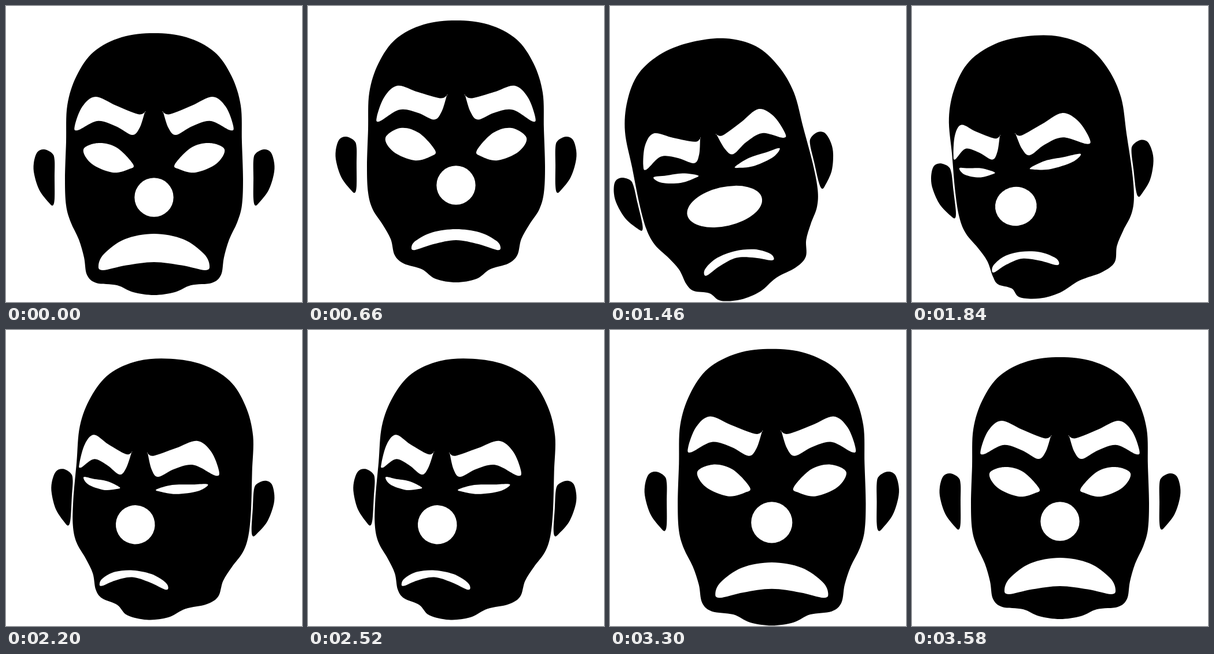
An HTML page with a canvas that plays this animation: 512 by 512 pixels, repeating every 3620 ms.

```html
<!DOCTYPE html>
<html>
<head>
<meta charset="utf-8">
<title>Angry head</title>
<style>
  html, body { margin: 0; height: 100%; overflow: hidden; background: #fff; }
  canvas { display: block; width: 100%; height: 100%; }
</style>
</head>
<body>
<canvas width="512" height="512"></canvas>
<script>
const LOOP = 3620, NECK = 545, RADIUS = 156, DEGREE = Math.PI / 180;
const ctx = document.querySelector('canvas').getContext('2d');

const clamp = u => Math.min(1, Math.max(0, u));
const smooth = u => u * u * (3 - 2 * u);
const ramp = (v, from, to) => smooth(clamp((v - from) / (to - from)));
const mix = (a, b, u) => a + (b - a) * u;
const wave = (t, zero, period) => Math.sin(2 * Math.PI * (t - zero) / period);

// Left-side outlines; x counts from the middle of the face.
const points = text => text.split(' ').map(pair => pair.split(',').map(Number));
const HEAD = points('0,47 -56,54 -104,79 -134,121 -150,172 -152,235 -154,300 -152,345 -144,374 -130,404 -121,435 -116,465 -100,479 -64,483 -36,495 0,500');
const EAR = points('0,-49 14,-42 18,-30 18,0 18,36 15,48 8,43 -8,22 -17,-5 -18,-25 -12,-44');
const BROW = points('-16,184 -28,187 -66,172 -101,157 -124,174 -137,207 -132,215 -98,199 -66,208 -38,223 -25,211');

const angry = {
  lift: 0, jaw: 0, squeeze: 1, brow: 0, slope: 0, nose: 331,
  eyeInner: 274, eyeTop: 237, eyeBottom: 288, eyeOuter: 248,
  mouthWidth: 96, mouthTop: 394, mouthMiddle: 443, mouthBottom: 457
};
const sad = {
  lift: -22, jaw: 1, squeeze: 1, brow: -15, slope: -.115, nose: 310,
  eyeInner: 250, eyeTop: 211, eyeBottom: 267, eyeOuter: 228,
  mouthWidth: 77, mouthTop: 386, mouthMiddle: 405, mouthBottom: 422
};
const squinting = {
  lift: 2, jaw: 1, squeeze: .92, brow: 31, slope: 0, nose: 339,
  eyeInner: 276, eyeTop: 264, eyeBottom: 282, eyeOuter: 262,
  mouthWidth: 62, mouthTop: 418, mouthMiddle: 430, mouthBottom: 448
};
const blend = (a, b, u) =>
  Object.fromEntries(Object.keys(a).map(key => [key, mix(a[key], b[key], u)]));

const flip = shape => shape.map(([x, y]) => [-x, y]);
const close = half => [...half, ...flip(half.slice(1, -1)).reverse()];

function headShape(face, chin) {
  const half = HEAD.map(([x, y]) => {
    const pull = face.jaw * ramp(y, 370, 460) * ramp(-x, 20, 110);
    return [x + 10 * pull, y - 12 * pull];
  });
  return close(half).map(([x, y]) => [x - chin * ramp(y, 450, 500), y + face.lift]);
}

const earShape = face => EAR.map(([x, y]) => [x - 190 * face.squeeze, y + 297 + face.lift]);

const browShape = face => BROW.map(([x, y]) =>
  [x * face.squeeze, y + face.brow + face.slope * (x + 137)]);

const eyeShape = ({ eyeInner, eyeTop, eyeBottom, eyeOuter, squeeze }) => [
  [-36, eyeInner], [-64, mix(eyeTop, eyeInner, .22)], [-96, eyeTop], [-122, eyeOuter],
  [-108, mix(eyeOuter, eyeBottom, .62)], [-72, eyeBottom], [-44, mix(eyeInner, eyeBottom, .6)]
].map(([x, y]) => [x * squeeze, y]);

const mouthShape = ({ mouthWidth: w, mouthTop: top, mouthMiddle: mid, mouthBottom: bottom }) => close([
  [0, top], [-.53 * w, mix(top, bottom, .15)], [-.9 * w, mix(top, bottom, .55)],
  [-w, mix(top, bottom, .87)], [-.92 * w, bottom], [-.5 * w, mix(mid, bottom, .4)], [0, mid]
]);

// Fills a smooth closed curve through the points.
function fill(pts, color) {
  const n = pts.length, at = i => pts[(i + n) % n];
  ctx.beginPath();
  ctx.moveTo(...pts[0]);
  for (let i = 0; i < n; i++) {
    const [a, b, c, d] = [at(i - 1), at(i), at(i + 1), at(i + 2)];
    ctx.bezierCurveTo(
      b[0] + (c[0] - a[0]) / 6, b[1] + (c[1] - a[1]) / 6,
      c[0] - (d[0] - b[0]) / 6, c[1] - (d[1] - b[1]) / 6, ...c);
  }
  ctx.fillStyle = color;
  ctx.fill();
}

function drawFace(face, { tilt, turn, chin, stretch }) {
  // Features slide over a round head as it turns.
  const slide = x => RADIUS * Math.sin(Math.asin(x / RADIUS) - turn);
  const carve = shape => fill(shape.map(([x, y]) => [slide(x), y]), '#fff');

  ctx.translate(0, NECK);
  ctx.rotate(tilt);
  ctx.translate(0, -NECK);
  fill(headShape(face, chin), '#000');
  const ear = earShape(face), brow = browShape(face), eye = eyeShape(face);
  for (const side of [shape => shape, flip]) {
    fill(side(ear), '#000');
    carve(side([brow[0], ...brow]));
    carve(side(eye));
  }
  carve(mouthShape(face));
  ctx.beginPath();
  ctx.ellipse(slide(0), face.nose, 33.7 * (1 + stretch), 33.7, 0, 0, 2 * Math.PI);
  ctx.fill();
}

function draw(now) {
  const t = Math.floor(now % LOOP / 20) * 20;
  const sadden = smooth(1 - (1 - clamp((t - 420) / 640)) ** 4) / .937;
  const sadness = t < 2660 ? sadden : 1 - ramp(t, 2840, 3480);
  const shake = ramp(t, 1200, 1300) - ramp(t, 2620, 2720);
  const rage = ramp(t, 2660, 2740) - ramp(t, 3340, 3580);

  const phase = 2 * Math.PI * (t - 1467) / 320;
  const sway = {
    tilt: -13.2 * DEGREE * shake * Math.cos(phase),
    turn: .35 * shake * Math.sin(phase + 20 * DEGREE),
    chin: 32 * shake * Math.sin(phase + 48 * DEGREE),
    stretch: shake * Math.cos(phase) ** 4
  };

  ctx.setTransform(1, 0, 0, 1, 0, 0);
  ctx.fillStyle = '#fff';
  ctx.fillRect(0, 0, 512, 512);
  ctx.translate(256 + rage * (6 + 22 * wave(t, 3018, 120)), 256 + rage * (2 + 14 * wave(t, 3020, 80)));
  ctx.scale(1 + .056 * rage, 1 + .056 * rage);
  ctx.translate(0, -256);
  drawFace(blend(blend(angry, sad, sadness), squinting, shake), sway);
  requestAnimationFrame(draw);
}
requestAnimationFrame(draw);
</script>
</body>
</html>
```
